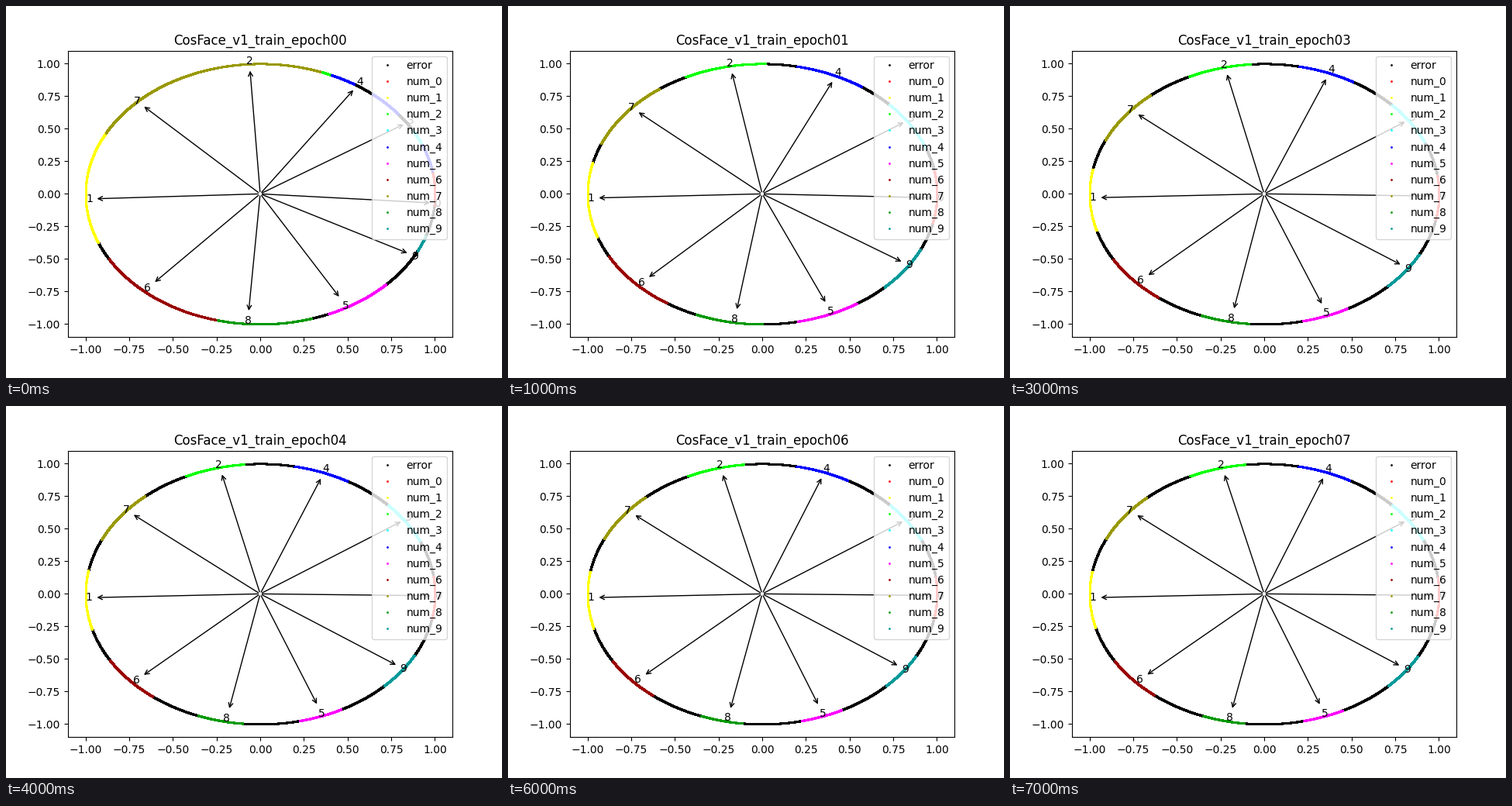
A matplotlib script for the animation above (8 s loop, 640 by 480 pixels).

```python
import numpy as np
import matplotlib.pyplot as plt
from matplotlib.animation import FuncAnimation

EPOCHS = 8
MARGIN = 0.1
COLORS = ["#ff0000", "#ffff00", "#00ff00", "#00ffff", "#0000ff",
          "#ff00ff", "#990000", "#999900", "#009900", "#009999"]

# Direction of each class weight in degrees, before and after training.
INITIAL = np.array([-5.5, 183.6, 94.7, 32.5, 56.4,
                    298.1, 228.4, 136.5, 264.8, 329.9])
SETTLED = np.array([-1.9, 183.0, 105.8, 34.2, 70.4,
                    288.6, 222.8, 142.3, 257.1, 322.5])

# Untrained, the classes are still mixed: digit, start and end of each arc.
MIXED = [(0, -5, 10), (4, 10, 22), (3, 22, 29), (4, 38, 50), (4, 57.5, 66),
         (2, 66, 70), (7, 70, 152), (1, 152, 202), (6, 210, 256),
         (8, 256, 287), (5, 293, 316), (9, 334, 341)]


def winning_arcs(directions, margin):
    """Arcs where cos(angle to own weight) - margin beats both neighbours."""
    order = np.argsort(directions)
    own = directions[order]
    half_gap = (np.roll(own, -1) - own) % 360 / 2
    reach = half_gap - np.degrees(margin / (2 * np.sin(np.radians(half_gap))))
    return list(zip(order, own - np.roll(reach, 1), own + reach))


def gaps(arcs):
    """Arcs left free between the given ones, sorted by angle."""
    starts = [start for _, start, _ in arcs]
    ends = [end for _, _, end in arcs]
    return list(zip(ends, starts[1:] + [starts[0] + 360]))


def plot_arcs(arcs, density, color, label):
    angles = [np.linspace(a, b, int((b - a) * density) + 1)
              for a, b in arcs if b > a]
    rad = np.radians(np.concatenate(angles))
    ax.plot(np.cos(rad), np.sin(rad), ".", c=color, ms=2, label=label)


def draw(epoch):
    ax.clear()
    fade = (1 + epoch) ** -1.5
    directions = SETTLED + (INITIAL - SETTLED) * fade
    arcs = MIXED
    if epoch > 0:
        arcs = winning_arcs(directions, MARGIN * (1 - 1.2 * fade))

    plot_arcs(gaps(arcs), 70, "black", "error")
    for digit, color in enumerate(COLORS):
        own = [(start, end) for d, start, end in arcs if d == digit]
        plot_arcs(own, 200, color, f"num_{digit}")

    for digit, angle in enumerate(np.radians(directions)):
        ax.annotate(str(digit), xy=(0, 0),
                    xytext=(np.cos(angle), np.sin(angle)),
                    arrowprops=dict(arrowstyle="<-"))

    ax.set_xlim(-1.1, 1.1)
    ax.set_ylim(-1.1, 1.1)
    ax.set_title(f"CosFace_v1_train_epoch{epoch:02d}")
    ax.legend(loc="upper right")


fig, ax = plt.subplots(figsize=(6.4, 4.8), dpi=100)
anim = FuncAnimation(fig, draw, frames=EPOCHS, init_func=lambda: None,
                     interval=1000, repeat=True)
plt.show()
```
